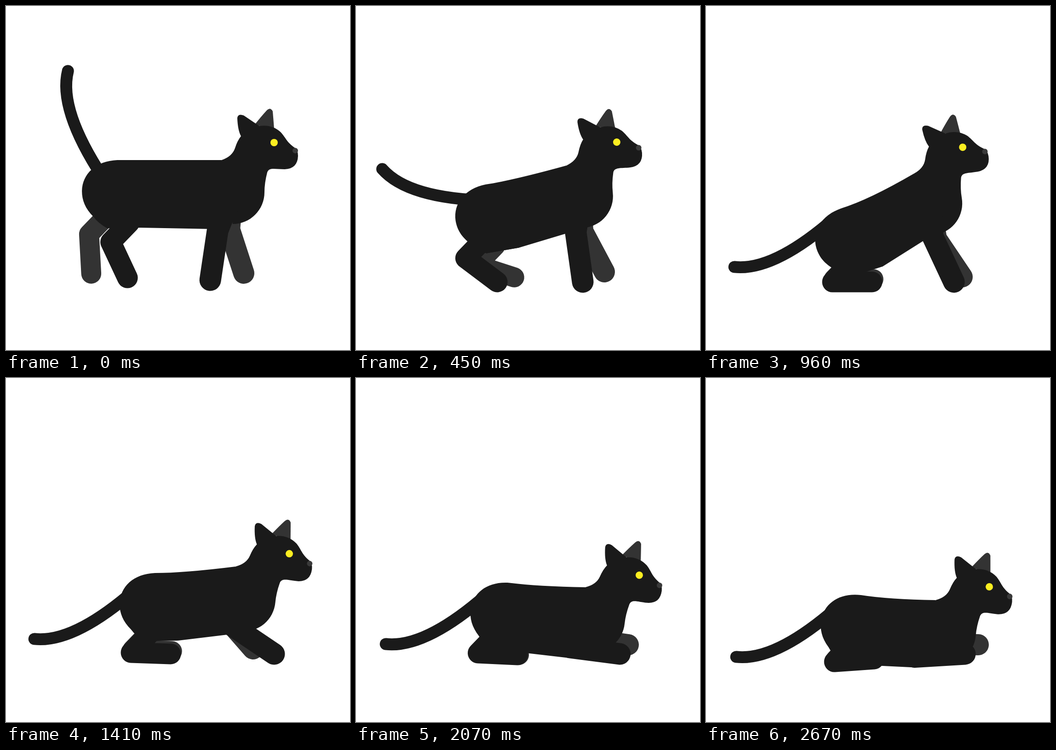
Write an HTML page with a canvas that moves like this. It is 748 px wide and 748 px high and loops after 2.7 s.

```html
<!DOCTYPE html>
<html lang="en">
<head>
<meta charset="utf-8">
<title>Cat lying down</title>
<style>
  html, body { margin: 0; height: 100%; overflow: hidden; background: #fff; }
  canvas { display: block; }
</style>
</head>
<body>
<canvas id="stage" width="748" height="748"></canvas>
<script>
const ctx = document.getElementById('stage').getContext('2d');
const LOOP = 2700, NEAR = '#1a1a1a', FAR = '#333';
const SHIN = 86, FOREARM = 109;

// Rigid parts, drawn in the standing pose
const headShape = new Path2D(`M469 335Q492 327 498 309Q503 293 511 283Q504 270 503 244
  Q504 233 517 238L551 261Q578 257 597 274C610 288 609 295 629 309Q635 314 635 326
  Q634 354 606 355C585 355 572 350 568 362Q562 385 562 405A69 69 0 0 1 493 474Z`);
const rumpShape = new Path2D(`M292 482L220 483Q200 472 190 458C172 440 165 422 165 402
  C166 365 195 337 242 335Z`);
const tailShape = new Path2D('M135 141C120 200 150 280 210 372');
const farEar = new Path2D('M540 259Q555 240 567 227Q575 219 580 229Q581 240 583 266Z');

const ramp = (ms, from, to) => Math.min(1, Math.max(0, (ms - from) / (to - from)));

// Moves the pivot of a standing part by (dx, dy) and turns the part around it.
const pose = (x, y, dx, dy, angle) =>
  new DOMMatrix().translate(x + dx, y + dy).rotate(angle).translate(-x, -y);

function at(m, x, y) {
  const p = m.transformPoint({ x, y });
  return [p.x, p.y];
}

function polar([x, y], angle, length) {
  const a = angle * Math.PI / 180;
  return [x + length * Math.cos(a), y + length * Math.sin(a)];
}

function within(m, paint) {
  ctx.save();
  ctx.setTransform(m);
  paint();
  ctx.restore();
}

function limb(color, width, ...points) {
  ctx.strokeStyle = color;
  ctx.lineWidth = width;
  ctx.beginPath();
  points.forEach(p => ctx.lineTo(...p));
  ctx.stroke();
}

function hindLeg(color, width, foot, angle) {
  const knee = polar(foot, angle, SHIN);
  limb(color, width, polar(knee, -46, 58), knee, foot);
}

function dot(x, y, r, color) {
  ctx.fillStyle = color;
  ctx.beginPath();
  ctx.arc(x, y, r, 0, Math.PI * 2);
  ctx.fill();
}

function draw(ms) {
  const crouch = ramp(ms, 0, 450), sit = ramp(ms, 450, 960), lunge = ramp(ms, 960, 1410),
        settle = ramp(ms, 1410, 1950), rest = ramp(ms, 1950, 2310), tuck = ramp(ms, 2310, 2670),
        swing = ramp(ms, 450, 870), slide = ramp(ms, 1410, 1800);

  const head = pose(583, 297,
    -16 * crouch - 9 * sit + 58 * lunge,
    -crouch + 11 * sit + 75 * lunge + 34 * settle + 38 * rest,
    -6.5 * crouch - 3.5 * sit + 15 * lunge + 1.5 * settle - 2 * rest);
  const rump = pose(242, 335,
    40 * crouch + 12 * sit + 30 * lunge + 7 * settle + 9 * rest - 3 * tuck,
    53 * crouch + 52 * sit - 16 * lunge + 8 * settle + 40 * rest,
    -9 * crouch - 8 * sit + 17 * lunge + 6 * settle + 3 * rest);
  const tail = pose(210, 372,
    80 * crouch - 10 * swing + 10 * Math.sin(Math.PI * swing) + 9 * rest - 5 * tuck,
    51 * crouch + 38 * swing + 33 * rest + 6 * tuck,
    -55.5 * crouch - 42.5 * swing);

  // Both hind feet drift alike once the cat sits.
  const drift = -3 * lunge - 6 * settle - 2 * rest + 15 * tuck;
  const tilt = 2 * lunge + 4 * settle - 10 * rest;
  const farHind = [185 + 159 * crouch + 20 * sit + drift,
                   582 + 8 * crouch + 4 * sit + 6 * slide + 6 * rest];
  const nearHind = [264 + 43 * crouch + 54 * sit + drift,
                    591 + 9 * crouch + 6 * rest + 5 * tuck];

  const farFore = [517 + 23 * crouch + 17 * sit - 20 * lunge + 55 * slide,
                   581 - 3 * crouch + 11 * sit - 9 * slide];
  const nearFore = [444 + 49 * crouch + 46 * sit + 44 * lunge - 7 * settle - 7 * rest - 6 * tuck,
                    596 + 4 * crouch];
  const farBend = -108 - 10 * crouch - 6 * sit - 7 * lunge - 38 * slide - 9 * rest;
  const nearBend = -81.5 - 16.5 * crouch - 17 * sit - 31 * lunge - 23 * settle - 10.5 * rest - 4 * tuck;
  const chest = at(head, 493, 405);
  const elbow = polar(nearFore, nearBend, FOREARM);

  ctx.fillStyle = '#fff';
  ctx.fillRect(0, 0, 748, 748);
  ctx.lineCap = ctx.lineJoin = 'round';

  ctx.fillStyle = FAR;
  within(head, () => ctx.fill(farEar));
  hindLeg(FAR, 43.5, farHind, -93 - 69 * crouch - 18 * sit + tilt);
  limb(FAR, 46, chest, polar(farFore, farBend, 100), farFore);

  ctx.fillStyle = ctx.strokeStyle = NEAR;
  ctx.lineWidth = 26;
  within(tail, () => ctx.stroke(tailShape));
  within(rump, () => ctx.fill(rumpShape));
  within(head, () => ctx.fill(headShape));

  // The trunk spans rump and chest; the belly ends on the back edge of the near foreleg.
  ctx.beginPath();
  ctx.moveTo(...at(rump, 242, 335));
  ctx.quadraticCurveTo(...at(rump, 304, 335), ...at(head, 469, 335));
  ctx.lineTo(...at(head, 515, 440));
  ctx.lineTo(...polar(elbow, nearBend - 90, 23));
  ctx.lineTo(...at(rump, 292, 482));
  ctx.lineTo(...at(rump, 220, 483));
  ctx.fill();

  hindLeg(NEAR, 45, nearHind, -115 - 28 * crouch - 37 * sit + tilt);
  limb(NEAR, 47, chest, elbow, nearFore);

  within(head, () => {
    dot(629, 314.5, 6, '#3a3a3a');
    dot(583, 297, 8, '#fcee21');
  });
}

function tick() {
  draw(performance.now() % LOOP);
  requestAnimationFrame(tick);
}
tick();
</script>
</body>
</html>
```
